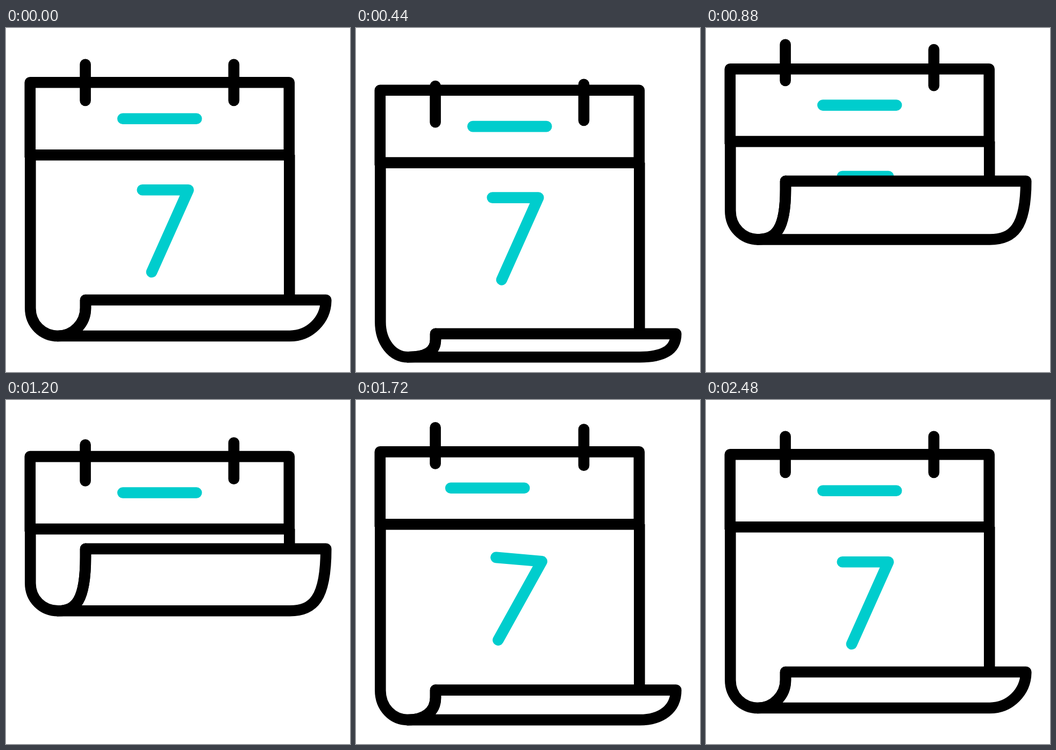
An HTML page for the animation above (2880 ms loop, 640x640 px).

```html
<!DOCTYPE html>
<html lang="en">
<head>
<meta charset="utf-8">
<title>Calendar</title>
<style>
  html, body { margin: 0; width: 100%; height: 100%; overflow: hidden; background: #fff; }
  svg { display: block; width: 100%; height: 100%; }
  path { fill: none; stroke: #000; stroke-width: 20.6; stroke-linejoin: round; }
  .cap { stroke-linecap: round; }
  .accent { stroke: #00cdcd; }
  #flap { fill: #fff; }
</style>
</head>
<body>
<svg viewBox="0 0 640 640">
  <defs>
    <clipPath id="page"><rect id="pageRect" x="0" y="0" width="640" height="506"/></clipPath>
    <clipPath id="header"><rect x="45" y="101" width="482" height="135"/></clipPath>
  </defs>
  <g clip-path="url(#page)">
    <g id="digitBox"><path id="digit" class="cap accent" d="M253.7 301.2H339.3L271 454"/></g>
  </g>
  <path id="sides"/>
  <path id="flap"/>
  <path id="curl" class="cap"/>
  <g id="head">
    <g clip-path="url(#header)">
      <path id="dash" class="cap accent" d="M217.3 168.7H354.3M-142.7 168.7H-5.7"/>
    </g>
    <path d="M44.8 241V101.3H526.8V241M44.8 236.2H526.8"/>
  </g>
  <path id="ringL" class="cap" d="M147.6 67.8V135"/>
  <path id="ringR" class="cap" d="M423.9 67.8V135"/>
</svg>
<script>
const LOOP = 2880, STEP = 40, RING_LAG = 40;

// Each track is a list of [time, value].
const tracks = {
  body: [[0, 0], [340, 18], [440, 14.4], [560, -8], [640, -27.8], [760, -36],
         [1120, 6], [1200, 3.8], [1500, -12], [1520, -11], [1680, -6], [1960, 0]],
  ring: [[0, 0], [370, 41], [440, 37], [560, -8], [600, -21.5], [640, -36], [760, -46],
         [1100, 18], [1160, 15.5], [1200, 11.8], [1480, -29.6], [1500, -31.5],
         [1520, -30], [1680, -16.5], [1940, 0]],
  bottom: [[0, 573], [330, 624], [440, 612.3], [560, 541.5], [640, 463.6], [1050, 375],
           [1200, 392.3], [1520, 513.3], [1600, 564], [1680, 596], [2000, 574], [2160, 573]],
  height: [[0, 67], [360, 39], [440, 43.4], [640, 80.6], [1060, 118], [1200, 115.4],
           [1520, 69], [1680, 55], [2000, 66.5], [2160, 67]],
  bend: [[0, 52], [400, 66], [640, 58], [1200, 51.5], [1520, 58], [1900, 52]],
  round: [[0, 0.552], [440, 0.73], [640, 0.79], [1200, 0.82], [1520, 0.75], [1960, 0.552]],
  dash: [[1200, 0], [1520, 180], [1840, 360]],
  tilt: [[1440, 0], [1520, 1.7], [1740, 5], [2000, 0.3], [2230, -3], [2480, 0]]
};

const $ = id => document.getElementById(id);
const set = (id, name, value) => $(id).setAttribute(name, value);
const shift = (id, x, y) => set(id, "transform", `translate(${x} ${y})`);

// Smooth curve through the keys that never overshoots them.
function slope(keys, i) {
  if (i === 0 || i === keys.length - 1) return 0;
  const rate = j => (keys[j + 1][1] - keys[j][1]) / (keys[j + 1][0] - keys[j][0]);
  const a = rate(i - 1), b = rate(i);
  return a * b > 0 ? 2 * a * b / (a + b) : 0;
}

function at(name, t) {
  const keys = tracks[name], last = keys.length - 1;
  if (t <= keys[0][0]) return keys[0][1];
  if (t >= keys[last][0]) return keys[last][1];
  const i = keys.findIndex(k => k[0] > t) - 1;
  const [t0, v0] = keys[i], [t1, v1] = keys[i + 1];
  const d = t1 - t0, u = (t - t0) / d, w = 1 - u;
  return w * w * ((1 + 2 * u) * v0 + u * d * slope(keys, i))
       + u * u * ((1 + 2 * w) * v1 - w * d * slope(keys, i + 1));
}

function draw(t) {
  const body = at("body", t), low = at("bottom", t), h = at("height", t);
  const top = low - h, bend = at("bend", t), k = at("round", t);
  const kx = 0.552 + (k - 0.552) * 0.3;
  const neck = top + Math.min(15, h * 0.25);
  const loop = `C148 ${neck + (low - neck) * k} ${97 + 51 * kx} ${low} 97 ${low}`;

  shift("head", 0, body);
  shift("ringR", 0, at("ring", t));
  shift("ringL", 0, at("ring", t - RING_LAG));
  shift("dash", t < 1840 ? at("dash", t) : 0, 0);
  shift("digitBox", 0, body);
  set("digit", "transform", `rotate(${at("tilt", t)} 296.5 377.5)`);
  set("pageRect", "height", top);

  set("sides", "d", `M527.3 ${236 + body}V${top}M45.3 ${236 + body}V${low - bend}`
    + `C45.3 ${low - bend * 0.43} ${97 - 51.7 * 0.57} ${low} 97 ${low}`);
  set("flap", "d", `M148 ${top}H595.3`
    + `C595.3 ${top + h * k} ${528 + 67.3 * kx} ${low} 528 ${low}H97`
    + `C${97 + 51 * kx} ${low} 148 ${neck + (low - neck) * k} 148 ${neck}Z`);
  set("curl", "d", `M148 ${top}V${neck}${loop}`);
}

function frame(now) {
  draw(Math.floor(now % LOOP / STEP) * STEP);
  requestAnimationFrame(time => frame(time - start));
}

const start = performance.now();
frame(0);
</script>
</body>
</html>
```
